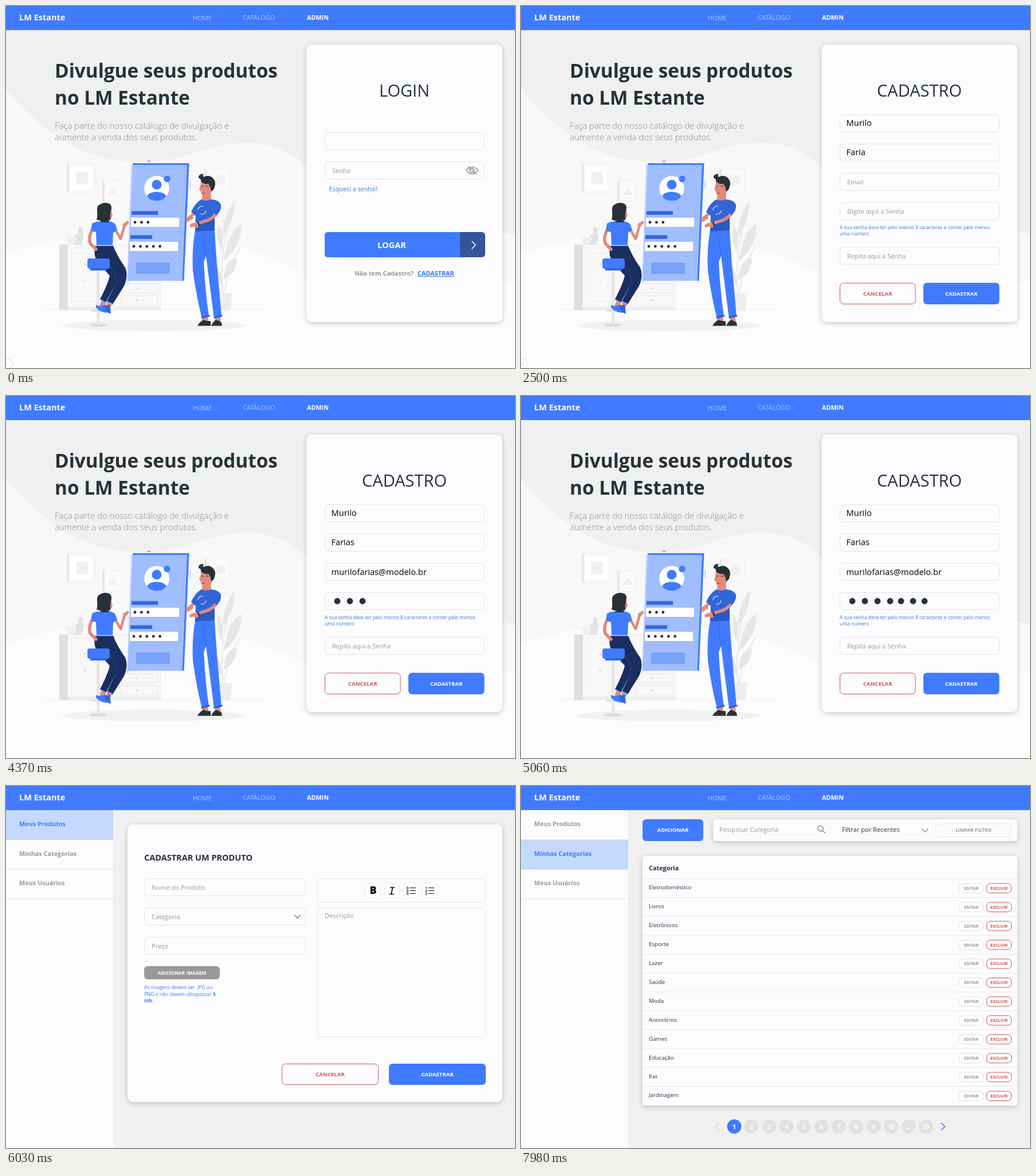
These frames come from a looping animation (888 px wide and 631 px high, 8000 ms). An HTML page:

```html
<!DOCTYPE html>
<html lang="pt">
<head>
<meta charset="utf-8">
<style>
html, body { margin: 0; width: 100%; height: 100%; overflow: hidden; background: #fcfcff; }
svg { display: block; width: 888px; height: 631px; }
text { font-family: "Open Sans", "Noto Sans", sans-serif; white-space: pre; }
</style>
</head>
<body>
<svg id="stage" viewBox="0 0 888 631" xmlns="http://www.w3.org/2000/svg"></svg>
<script>
const LOOP = 8000;
const BLUE = '#407bff', INK = '#263238', GREY = '#999', RED = '#d0544c',
      LINE = '#e3e3e5', PAPER = '#fcfcff', BACK = '#f0f0f0', SKIN = '#e4897b', NAVY = '#1a2e60';
const DOTS = [578, 600, 622, 644, 663, 684, 704];

// Drawing helpers
const rect = (x, y, w, h, fill, r = 0, extra = '') =>
  `<rect x="${x}" y="${y}" width="${w}" height="${h}" rx="${r}" fill="${fill}" ${extra}/>`;
const path = (d, fill, extra = '') => `<path d="${d}" fill="${fill}" ${extra}/>`;
const line = (d, color, w = 1, extra = '') =>
  path(d, 'none', `stroke="${color}" stroke-width="${w}" stroke-linecap="round" stroke-linejoin="round" ${extra}`);
const circle = (x, y, r, fill, extra = '') => `<circle cx="${x}" cy="${y}" r="${r}" fill="${fill}" ${extra}/>`;
const oval = (x, y, rx, ry, fill) => `<ellipse cx="${x}" cy="${y}" rx="${rx}" ry="${ry}" fill="${fill}"/>`;
const text = (x, y, s, size, fill = INK, weight = 400, extra = '') =>
  `<text x="${x}" y="${y}" font-size="${size}" fill="${fill}" font-weight="${weight}" ${extra}>${s}</text>`;
const mid = (x, y, s, size, fill, weight = 400) => text(x, y, s, size, fill, weight, 'text-anchor="middle"');
const card = (x, y, w, h, r = 10) => rect(x, y, w, h, PAPER, r, 'filter="url(#soft)"');
const box = (x, y, w, h, r = 6, color = LINE, fill = 'none') =>
  rect(x + .5, y + .5, w - 1, h - 1, fill, r, `stroke="${color}"`);
const group = (id, body) => `<g id="${id}">${body}</g>`;
const hint = (id, x, y, s) => group(id, text(x, y, s, 11.1, GREY));
const dots = (id, y) => group(id, DOTS.map(x => circle(x, y, 5.4, INK)).join(''));
const typed = (id, x, y) => text(x, y, '', 14.6, '#000', 400, `id="${id}"`);
const button = (x, y, w, h, s, fill = BLUE, size = 9.65) =>
  rect(x, y, w, h, fill, 6) + mid(x + w / 2, y + h / 2 + size * .36, s, size, '#fff', 700);
const outline = (x, y, w, h, s, color, size = 9.65, border = color) =>
  box(x, y, w, h, 6, border) + mid(x + w / 2, y + h / 2 + size * .36, s, size, color, 700);

function navBar() {
  return rect(0, 0, 888, 42, BLUE) +
    text(23, 25.3, 'LM Estante', 14.5, '#fff', 700) +
    text(326, 24.6, 'HOME', 11.1, '#a9c4ff') +
    text(413, 24.4, 'CATÁLOGO', 11.1, '#a9c4ff') +
    text(525, 24.2, 'ADMIN', 10.8, '#fff', 700);
}

function room() {
  const frame = (x, y, w, h, inner) =>
    rect(x, y, 4, h, '#e6e6e6') + rect(x + 4, y, w - 4, h, '#fafafb', 0, 'stroke="#ededed"') + inner;
  const drawer = y => rect(201, y, 64, 16, 'none', 0, 'stroke="#e6e6e6"') + circle(229, y + 8, 2, '#e0e0e0');
  const leaf = d => path(d, '#e6e6e6', 'stroke="#f4f4f4" stroke-width=".7"');
  return oval(258, 557, 160, 10, '#f1f1f2') + line('M62 529.5H450', '#f0f0f0') +
    frame(106, 275, 48, 50, rect(112, 281, 38, 38, '#fff') + rect(123, 289, 20, 22, '#f0f0f0')) +
    frame(168, 305, 33, 35, path('M186 317l9 12h-18z', '#efefef')) +
    frame(346, 284, 44, 40, circle(374, 303, 9, '#f0f0f0')) +
    rect(93, 416, 177, 114, '#f8f8f9', 0, 'stroke="#ececec"') + rect(93, 416, 15, 114, '#dfdfdf') +
    rect(113, 422, 45, 92, 'none', 0, 'stroke="#ececec"') +
    rect(119, 430, 33, 76, 'none', 0, 'stroke="#f0f0f0"') +
    circle(138, 450, 2, '#e0e0e0') + circle(138, 478, 2, '#e0e0e0') +
    drawer(484) + drawer(505) + rect(108, 524, 162, 6, '#eeeeef') +
    path('M126 386h8l-1 8c4 7 1 16-2 22h-12c-4-8-2-16 7-20z', '#e2e2e2') +
    path('M105 402h18c0 10-4 14-9 14s-9-4-9-14z', '#f0f0f0') +
    line('M379 502Q371 430 394 360M381 500Q386 456 409 420', '#e0e0e0', 1.3) +
    leaf('M378 402Q378 366 399 338Q401 372 378 402z') +
    leaf('M376 428Q366 410 370 379Q384 400 376 428z') +
    leaf('M379 446Q388 390 411 380Q412 418 379 446z') +
    leaf('M379 477Q383 439 403 439Q403 466 379 477z') +
    leaf('M378 490Q363 474 362 448Q378 460 378 490z') +
    path('M368 500h27l-4 31h-19z', '#ededee');
}

function board() {
  const row = (x, y, n, barW) =>
    rect(x + 1, y - 11.5, barW, 6.5, '#3468dc') + rect(x, y, 84, 16, '#fff') +
    Array.from({length: n}, (_, i) => circle(x + 7 + i * 11.4, y + 8, 2.4, INK)).join('');
  return path('M218 277H222L214 482H211z', '#c9dafd') +
    path('M221 275H319L309 479H212z', '#a0bdff') +
    path('M221 274H319.5L319.4 277H221z', BLUE) +
    path('M316 275H319.5L310.5 479H307.5z', BLUE) +
    line('M247 270.5H252', '#5b6a86', 1.2) + line('M321.2 304V318', '#88adff') +
    circle(263, 318, 21.8, '#fff') + circle(263, 311.5, 8.5, BLUE) +
    path('M246 331.5Q250 324 263 324T280 331.5Q274 339.8 263 339.8T246 331.5z', BLUE) +
    circle(281, 301.5, 5.7, BLUE) +
    row(218, 369, 3, 46) + row(216, 411, 5, 38) +
    rect(228, 448, 57, 18, '#78a2fb', 0, 'stroke="#6591f5"');
}

function woman() {
  return oval(161, 556, 16, 3, '#dcdcdc') + rect(158.5, 458, 5, 97, '#e6e6e6') +
    line('M150 531H174', '#dcdcdc', 3) +
    path('M167 512l8 3-4 11-8-2zM177 514l9 3-5 11-7-2z', SKIN) +
    path('M157 521Q164 525 171 521L177 535Q164 534 157 526z', BLUE) +
    path('M172 520Q176 524 181 520L183 536Q176 536 172 527z', '#3266dc') +
    path('M156 418H187Q194 436 208 456Q214 470 206 488L186 520L176 515L193 482L174 517L164 511Q178 484 181 470L161 448Q151 434 156 418z', NAVY) +
    line('M193 482Q191 460 172 441', '#32477d') +
    line('M165 512L174 517M176 515L186 520', '#7ea6ff', 2) +
    rect(142, 440, 39, 18, BLUE, 4) + rect(147, 457.5, 29, 3.5, '#3266dc') +
    path('M166 366h13l1 12h-16z', SKIN) +
    path('M180 349Q185 352 184 359L186 364L184 370Q181 373 177 371z', SKIN) +
    path('M162 347Q172 340 181 345Q186 349 183 357Q181 365 182 373Q170 378 158 372Q160 366 159 358Q158 350 162 347z', INK) +
    line('M151 389Q143 403 147 414L157 424', SKIN, 5.5) +
    line('M191 390L200 406L207 382M207 383L212 377M206 381L211 378', SKIN, 4.5) +
    path('M150 379Q157 375 164 375.5H181Q189 377 191 381L194 391L187 395L186 418H158L157 394L148 392z', BLUE) +
    line('M166 375.8H179', NAVY, 2.2) + line('M158 417.5H186', '#c5d8ff', 1.4);
}

function man() {
  return path('M341 537h11l1 14h-10zM363 537h10l2 14h-9z', SKIN) +
    path('M334 557Q338 551 344 547Q352 550 357 549V557.5H334zM358 557Q361 551 366 547Q374 550 376 552L377 557.5H358z', INK) +
    path('M330 391H364Q366 424 368 450L376 541L363 545L349 436L345 446Q347 492 354 541L342 545Q331 501 326 461Q324 425 330 391z', BLUE) +
    line('M349 436L344 400', '#3167dc') + line('M342 543L354 540M364 543L376 540', '#2d60cd', 3) +
    path('M343 321h14l1 18h-16z', SKIN) +
    path('M341 304H358Q362 312 360 322Q356 332 348 332Q341 331 339.5 323L337 319L339 314z', SKIN) +
    line('M342 327L347 326', '#8d4039', 1) + line('M341 314H344M349 314H353', INK, 1.2) +
    path('M336 300Q335 292.5 345 292.5Q342 296 345 298Q354 293 361 300Q367 306 364 315Q363 321 358 323Q357 314 353 310Q345 311 340 306Q341 301 336 300z', INK) +
    line('M329 361L317 371M316 374L324 369', SKIN, 5) +
    path('M341 337Q348 341 358 337Q371 338 375 346Q374 356 364 366V391L330 393L331 366L323 359Q330 343 341 337z', '#3166d9') +
    path('M331 379L346 378L364 370V391L330 393z', '#2859c5') +
    line('M369 359Q360 373 344 376L323 383M326 381L333 384', SKIN, 5.5) +
    path('M359 356L374 345Q378 354 367 365z', '#3166d9') +
    line('M335 377L337 382', INK, 2.5) +
    circle(342, 356, 7, 'none', 'stroke="#dbe6ff" stroke-width="1.2" stroke-dasharray="13 9"');
}

function home() {
  return rect(0, 0, 888, 631, BACK) +
    path('M0 147C55 202 110 268 230 272C320 274 340 238 425 238C475 240 500 260 525 280L888 400V631H0z', '#f8f8f9') +
    path('M0 431C50 417 85 405 145 402C300 390 420 410 524 469C640 520 800 515 888 477V631H0z', PAPER) +
    text(85, 125, 'Divulgue seus produtos', 33.3, INK, 700) +
    text(85, 171.5, 'no LM Estante', 33.3, INK, 700) +
    text(85, 213.7, 'Faça parte do nosso catálogo de divulgação e', 14.95, '#8a8a8a', 300) +
    text(85, 234, 'aumente a venda dos seus produtos.', 14.95, '#8a8a8a', 300) +
    room() + board() + woman() + man() +
    group('badge', circle(3, 623.5, 8.5, '#fff', 'stroke="#dadada"') + rect(-1, 623, 8, 1, '#dedede')) +
    card(524.5, 67, 341.5, 484);
}

function login() {
  return mid(695, 157.5, 'LOGIN', 29, INK) +
    box(556, 220, 279, 31) + typed('user', 571, 240.5) +
    box(556, 271, 279, 31) + hint('passHint', 569, 290.5, 'Senha') + dots('pass', 287) +
    line('M803 286.5Q813 274 823.5 286.5Q813 299 803 286.5zM806 280L821 293', '#8f8f8f', 1.6) +
    circle(813, 286.5, 3.8, 'none', 'stroke="#8f8f8f" stroke-width="1.6"') +
    text(563.5, 323, 'Esqueci a senha?', 10.8, '#3f7fc9') +
    rect(556, 394, 280, 44, '#33569b', 6) + path('M562 394H792V438H562Q556 438 556 432V400Q556 394 562 394z', BLUE) +
    mid(673, 422.2, 'LOGAR', 14.6, '#fff', 700) + line('M813 410L819 416.5L813 423', '#fff', 1.5) +
    text(608, 470, 'Não tem Cadastro?', 10.85, GREY, 700) +
    text(718, 470, 'CADASTRAR', 10.85, '#3a78d8', 700, 'text-decoration="underline"');
}

function signup() {
  return mid(695, 157.5, 'CADASTRO', 29, INK) +
    [189, 240, 291, 342, 420].map(y => box(556, y, 279, 31)).join('') +
    hint('firstHint', 569, 208.5, 'Nome') + typed('first', 567.5, 209) +
    hint('lastHint', 569, 259.5, 'Sobrenome') + typed('last', 567.5, 260) +
    hint('mailHint', 569, 310.5, 'Email') + typed('mail', 567.5, 311.5) +
    hint('newHint', 569, 361.5, 'Digite aqui a Senha') + dots('fresh', 357.5) +
    text(556, 388.6, 'A sua senha deve ter pelo menos 8 caracteres e conter pelo menos', 8.43, '#3a7bd5') +
    text(556, 400.4, 'uma número', 8.43, '#3a7bd5') +
    hint('againHint', 569, 439.5, 'Repita aqui a Senha') + dots('again', 435.5) +
    outline(556, 482.5, 132.5, 37.5, 'CANCELAR', RED) + button(702, 482.5, 132.5, 37.5, 'CADASTRAR');
}

function sidebar(active) {
  const names = ['Meus Produtos', 'Minhas Categorias', 'Meus Usuários'];
  return rect(0, 0, 888, 631, BACK) + rect(0, 42, 187, 589, PAPER) +
    names.map((s, i) => {
      const y = 42 + i * 51.6, on = i === active;
      return rect(0, y + 51, 187, 1, '#e4e4e4') + (on ? rect(0, y, 187, 52, '#c5d8fd') : '') +
        text(23, y + 28, s, 10.85, on ? BLUE : GREY, 700);
    }).join('');
}

function product() {
  const list = x => [177.5, 182.5, 187.5].map(y => line(`M${x} ${y}h9`, '#000', 1.2)).join('');
  const icons = [627, 660, 693, 726].map(x => box(x, 169, 27, 27, 5, '#e9e9ee', '#fff')).join('') +
    mid(640.5, 188.3, 'B', 18, '#000', 800) + line('M670.5 177H677.5M669 188.5H676M674.5 177L672 188.5', '#000', 1.6) +
    list(705.5) + list(737.5) +
    [177.5, 182.5, 187.5].map((y, i) =>
      circle(700.5, y, 1.5, 'none', 'stroke="#000"') + mid(733, y + 2, i + 1, 5.5, '#000', 700)).join('');
  return sidebar(0) + card(212, 67, 654, 484) +
    text(241, 130, 'CADASTRAR UM PRODUTO', 14.5, INK, 700) +
    box(241, 161, 282, 31) + text(254, 180.7, 'Nome do Produto', 11.1, GREY) +
    box(241, 212, 282, 31) + text(254, 231.5, 'Categoria', 11.1, GREY) +
    line('M503.5 225L508.5 230.5L513.5 225', '#777', 1.2) +
    box(241, 263, 282, 31) + text(254, 282.5, 'Preço', 11.1, GREY) +
    button(241, 314, 132, 23, 'ADICIONAR IMAGEM', GREY, 8.4) +
    text(241, 354, 'As imagens devem ser  JPG ou', 8.5, BLUE) +
    text(241, 365.7, 'PNG e não devem ultrapassar <tspan font-weight="700">5</tspan>', 8.5, BLUE) +
    text(241, 377.4, 'mb.', 8.5, BLUE, 700) +
    box(542.5, 161, 294.5, 42) + icons +
    box(542.5, 212, 294.5, 226) + text(556, 230, 'Descrição', 11.1, GREY) +
    outline(481, 484, 169, 37, 'CANCELAR', RED) + button(668, 484, 169, 37, 'CADASTRAR');
}

function categories() {
  const rows = ['Eletrodoméstico', 'Livros', 'Eletrônicos', 'Esporte', 'Lazer', 'Saúde', 'Moda',
    'Acessórios', 'Games', 'Educação', 'Pet', 'Jardinagem'];
  const pages = [1, 2, 3, 4, 5, 6, 7, 8, 9, 10, '...', 35];
  return sidebar(1) + button(212, 58, 106, 38, 'ADICIONAR') +
    card(335, 58, 531, 38, 6) + text(346, 80, 'Pesquisar Categoria', 11.1, GREY) +
    line('M346 85.5H533M560 85.5H711', '#f0f0f0') +
    circle(522.5, 74, 4.6, 'none', 'stroke="#777" stroke-width="1.3"') + line('M526 77.5L530 81.5', '#777', 1.3) +
    text(560, 80, 'Filtrar por Recentes', 11.1, INK) + line('M700 74.5L705 80L710 74.5', '#888', 1.2) +
    outline(723, 65.5, 133, 23.5, 'LIMPAR FILTRO', GREY, 8.4, LINE) +
    card(212, 122, 654, 435, 6) + text(223, 146.7, 'Categoria', 10.85, INK, 700) +
    rows.map((s, i) => {
      const y = 161 + i * 32.92;
      return rect(212, y, 654, 1, '#e8e8ea') + text(223, y + 19.3, s, 9.8, INK) +
        outline(764, y + 8.4, 43, 17.5, 'EDITAR', GREY, 7.3, LINE) +
        outline(812, y + 8.4, 44, 17.5, 'EXCLUIR', RED, 7.3);
    }).join('') +
    line('M345 587.5L339.5 593.5L345 599.5', '#d8d8d8', 1.4) +
    pages.map((s, i) => {
      const x = 372 + i * 30.4;
      return circle(x, 593.5, 12.4, i ? '#e1e1e1' : BLUE) + mid(x, 597.5, s, 10.85, '#fff', 700);
    }).join('') +
    line('M733.5 587.5L739.5 593.5L733.5 599.5', BLUE, 1.6);
}

document.getElementById('stage').innerHTML =
  `<defs><filter id="soft" x="-10%" y="-30%" width="120%" height="160%">
    <feDropShadow dx="0" dy="2" stdDeviation="4.5" flood-color="#000" flood-opacity=".22"/></filter></defs>` +
  group('home', home()) + group('login', login()) + group('signup', signup()) +
  group('product', product()) + group('categories', categories()) + navBar();

// Start time, time per character, and the placeholder each entry hides
const TYPING = [
  {id: 'user', start: 70, step: 66, value: 'vendedor@modelo.br'},
  {id: 'first', start: 1800, step: 70, value: 'Murilo', hint: 'firstHint'},
  {id: 'last', start: 2215, step: 70, value: 'Farias', hint: 'lastHint'},
  {id: 'mail', start: 2695, step: 70, value: 'murilofarias@modelo.br', hint: 'mailHint'}
];
const SECRETS = [
  {id: 'pass', start: 1240, step: 69, hint: 'passHint'},
  {id: 'fresh', start: 4225, step: 70, hint: 'newHint'},
  {id: 'again', start: 5200, step: 80, hint: 'againHint'}
];
const SCENES = {home: [0, 5965], login: [0, 1795], signup: [1795, 5965], product: [5965, 7905], categories: [7905, LOOP],
  badge: [0, 2700]};

const el = id => document.getElementById(id);
const show = (node, on) => { node.style.display = on ? '' : 'none'; };
const count = (t, e) => t < e.start ? 0 : Math.floor((t - e.start) / e.step) + 1;

function draw() {
  const t = performance.now() % LOOP;
  for (const id in SCENES) show(el(id), t >= SCENES[id][0] && t < SCENES[id][1]);
  for (const e of TYPING) {
    const n = count(t, e);
    el(e.id).textContent = e.value.slice(0, n);
    if (e.hint) show(el(e.hint), !n);
  }
  for (const e of SECRETS) {
    const n = count(t, e);
    [...el(e.id).children].forEach((dot, i) => show(dot, i < n));
    show(el(e.hint), !n);
  }
  requestAnimationFrame(draw);
}
draw();
</script>
</body>
</html>
```
